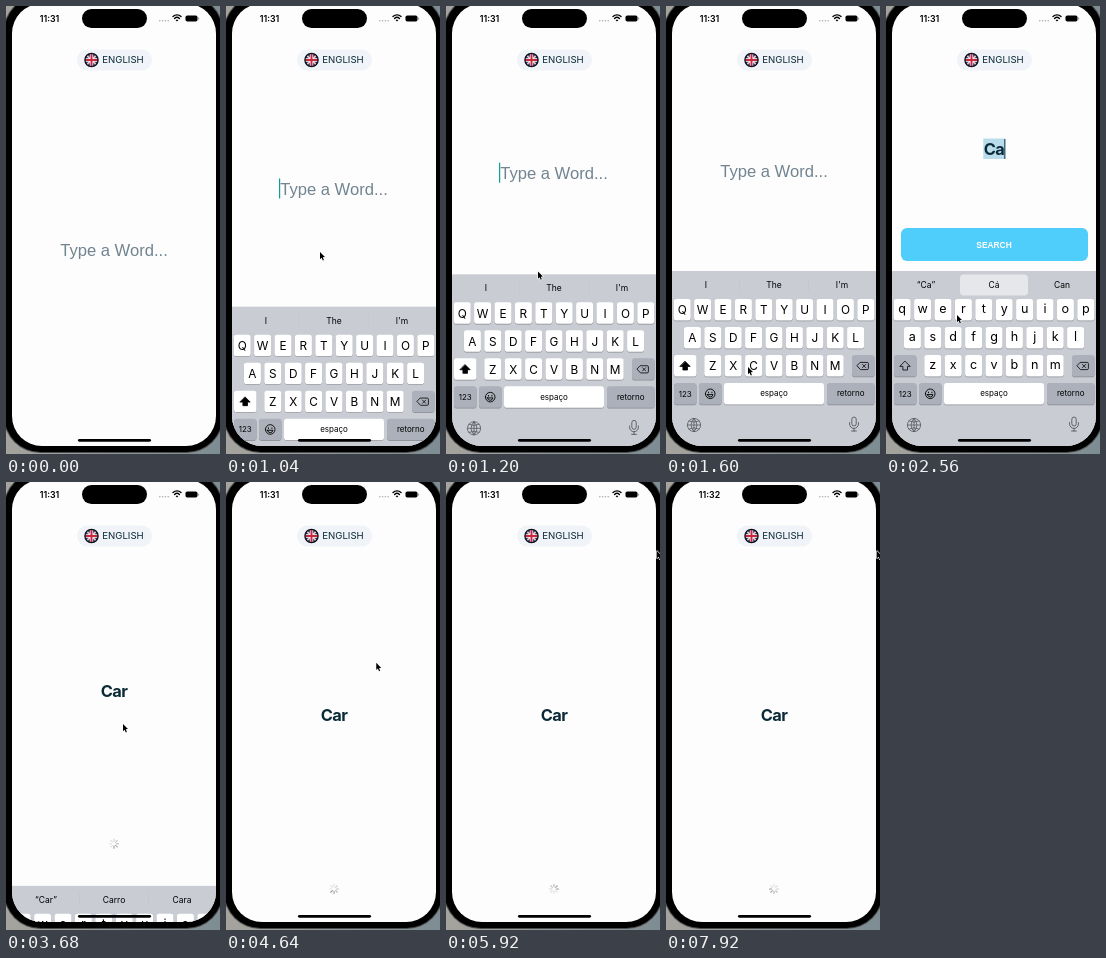
Recreate the animation shown at these times as an HTML page with a canvas. Size 214 px wide and 448 px high, loop 8000 ms.

```html
<!DOCTYPE html>
<html lang="en">
<head>
<meta charset="utf-8">
<title>Dictionary app</title>
<style>
  html, body { margin: 0; width: 100%; height: 100%; overflow: hidden; background: #000; }
  canvas { display: block; width: 214px; height: 448px; }
</style>
</head>
<body>
<canvas id="stage"></canvas>
<script>
const W = 214, H = 448, LOOP = 8000;
const canvas = document.getElementById('stage');
const scale = window.devicePixelRatio || 1;
canvas.width = W * scale;
canvas.height = H * scale;
const ctx = canvas.getContext('2d');

const UI = 'Inter, Roboto, sans-serif';
const APP = '"Liberation Sans", sans-serif';
const INK = '#0b2a38', KEY_GRAY = '#abb0ba', ICON = '#55595f';

// Event times in ms; the page content trails the keyboard slightly
const SHOW = 878, SHOW_PAGE = 885, HIDE = 3521, HIDE_PAGE = 3537, CLOCK = 6240;
const TAPS = [[1800, 'C'], [2160, 'a'], [2720, 'r']];
const SUGGESTIONS = [
  ['I', 'The', "I'm"],
  ['“C”', 'Cá', 'Can'],
  ['“Ca”', 'Cá', 'Can'],
  ['“Car”', 'Carro', 'Cara']
];
const KEY_ROWS = ['QWERTYUIOP', 'ASDFGHJKL', 'ZXCVBNM'];
const keyX = (row, i) => 108 + (i - (KEY_ROWS[row].length - 1) / 2) * 20.4;
const keyTop = row => 28 + row * 28;

// Pointer stops: time, x, y
const POINTER = [
  [80, 29, 318], [340, 90, 57], [640, 94, 246], [1060, 94, 246],
  [1600, 82, 361], [1780, 86, 364], [1840, 86, 364], [2130, 26, 334],
  [2220, 26, 334], [2560, 71, 309], [2690, 77, 306], [2780, 77, 306],
  [3360, 117, 242], [4320, 117, 242], [5120, 211, 69]
];

const spring = ms => {
  const x = Math.max(0, ms) * 0.01826;
  return 1 - (1 + x) * Math.exp(-x);
};

function box(x, y, w, h, r, fill) {
  ctx.beginPath();
  ctx.roundRect(x, y, w, h, r);
  ctx.fillStyle = fill;
  ctx.fill();
}

function text(str, x, y, size, { color = '#000', weight = 400, font = UI, align = 'center' } = {}) {
  ctx.font = `${weight} ${size}px ${font}`;
  ctx.textAlign = align;
  ctx.fillStyle = color;
  ctx.fillText(str, x, y);
}

function path(d, { fill, stroke, width = 0.8, x = 0, y = 0 }) {
  ctx.save();
  ctx.translate(x, y);
  const shape = new Path2D(d);
  ctx.lineWidth = width;
  ctx.lineCap = ctx.lineJoin = 'round';
  if (stroke) { ctx.strokeStyle = stroke; ctx.stroke(shape); }
  if (fill) { ctx.fillStyle = fill; ctx.fill(shape); }
  ctx.restore();
}

function drawBody() {
  const backdrop = ctx.createLinearGradient(0, 0, W, 0);
  backdrop.addColorStop(0, '#a5a39d');
  backdrop.addColorStop(1, '#7d8d93');
  ctx.fillStyle = backdrop;
  ctx.fillRect(0, 0, W, H);
  box(-2.5, -11, 220, 458, 37, '#4b4c4d');
  box(-1.5, -10, 218, 456, 36, '#000');
}

function drawStatus(t) {
  text(t < CLOCK ? '11:31' : '11:32', 43.5, 16, 8.8, { weight: 600 });
  box(76, 3, 65, 19, 9.5, '#000');
  for (let i = 0; i < 4; i++) box(153 + i * 2.8, 14, 1.6, 1.6, 0.8, '#aaa');
  path('M-4-1.5A5.8 5.8 0 0 1 4-1.5M-2.4.4A3.5 3.5 0 0 1 2.4.4', { stroke: '#000', width: 1.4, x: 171, y: 12 });
  path('M-1.3 2.2A1.9 1.9 0 0 1 1.3 2.2L0 3.6Z', { fill: '#000', x: 171, y: 12 });
  box(179.5, 9.5, 12, 6, 1.8, '#000');
  box(192.2, 11.5, 0.9, 2.2, 0.4, '#888');
}

function drawLanguage() {
  box(71, 43.5, 75, 21, 10.5, '#f0f3f7');
  ctx.save();
  ctx.translate(85.5, 54);
  ctx.beginPath();
  ctx.arc(0, 0, 6.6, 0, 7);
  ctx.clip();
  ctx.fillStyle = '#1d2f6b';
  ctx.fillRect(-7, -7, 14, 14);
  const diagonals = 'M-7-7L7 7M-7 7L7-7', cross = 'M0-7V7M-7 0H7';
  path(diagonals, { stroke: '#fff', width: 1.6 });
  path(diagonals, { stroke: '#c8283c', width: 0.6 });
  path(cross, { stroke: '#fff', width: 3.4 });
  path(cross, { stroke: '#c8283c', width: 2 });
  ctx.restore();
  ctx.beginPath();
  ctx.arc(85.5, 54, 6.6, 0, 7);
  ctx.lineWidth = 1.3;
  ctx.strokeStyle = '#0c1119';
  ctx.stroke();
  text('ENGLISH', 117, 57.4, 9.6, { color: INK });
}

function drawSpinner(y, t) {
  const head = Math.floor((t - 50) / 100);
  ctx.lineWidth = 1.1;
  ctx.lineCap = 'round';
  for (let i = 0; i < 8; i++) {
    const age = (head - i + 800) % 8, a = i * Math.PI / 4;
    ctx.strokeStyle = `rgba(70,70,75,${Math.max(0.16, 0.55 - age * 0.08)})`;
    ctx.beginPath();
    ctx.moveTo(108 + 2.3 * Math.sin(a), y - 2.3 * Math.cos(a));
    ctx.lineTo(108 + 4.6 * Math.sin(a), y - 4.6 * Math.cos(a));
    ctx.stroke();
  }
}

function drawWord(t, typed) {
  const searching = t >= HIDE;
  const shown = searching ? 1 - spring(t - HIDE_PAGE) : spring(t - SHOW_PAGE);
  const y = searching ? 233 - 90 * shown : typed ? 143 : 243.5 - 78.5 * shown;
  const word = 'Car'.slice(0, typed);
  const lastEdit = typed ? TAPS[typed - 1][0] : SHOW;
  const caret = t >= SHOW && !searching && (t - lastEdit) % 1000 < 500;

  ctx.letterSpacing = '-0.6px';
  ctx.font = `700 16.4px ${UI}`;
  const width = ctx.measureText(word).width;
  if (typed === 2) box(108 - width / 2 - 0.5, y - 10.5, width + 1, 20.5, 0, '#b9dcea');
  if (typed) text(word, 108, y + 6, 16.4, { weight: 700, color: INK });
  ctx.letterSpacing = '0px';
  if (!typed) text('Type a Word...', 108, y + 6, 16.6, { font: APP, color: '#718490' });
  if (caret) box(typed ? 108 + width / 2 : 53, y - 10, 1.2, 20, 0, typed ? '#174e62' : '#0f9d98');

  if (searching) drawSpinner(407 - 173 * shown, t);
  else if (typed) {
    box(15, 222, 187, 33, 6, '#4fcdfb');
    text('SEARCH', 108, 241.6, 8.4, { weight: 700, font: APP, color: '#fff' });
  }
}

function key(x, y, w, fill = '#fff') {
  box(x, y + 0.7, w, 21.5, 2.8, '#898c92');
  box(x, y, w, 21.5, 2.8, fill);
}

function drawSuggestions(typed) {
  if (typed === 1 || typed === 2) box(74, 3.5, 68, 21, 4, '#e5e7eb');
  else [73, 142].forEach(x => box(x, 7, 0.5, 13, 0, '#bfc3ca'));
  SUGGESTIONS[typed].forEach((s, i) => text(s, 40 + i * 68, 17, 8.5));
}

function drawPopup(t) {
  const tap = TAPS.find(([at]) => t >= at - 60 && t < at + 60);
  if (!tap) return;
  const letter = tap[1].toUpperCase();
  const row = KEY_ROWS.findIndex(r => r.includes(letter));
  const x = keyX(row, KEY_ROWS[row].indexOf(letter)), y = keyTop(row);
  box(x - 8.5, y - 8, 17, 29.5, 3, '#fff');
  box(x - 14, y - 29, 28, 26, 5, '#fff');
  text(tap[1], x, y - 10, 18);
}

function drawKeyboard(t, typed) {
  const shown = t < HIDE ? spring(t - SHOW) : 1 - spring(t - HIDE);
  if (shown < 0.004) return;
  ctx.save();
  ctx.translate(0, 441 - 176 * shown);
  ctx.fillStyle = '#c9ccd3';
  ctx.fillRect(0, 0, W, 200);
  drawSuggestions(typed);

  KEY_ROWS.forEach((row, r) => [...row].forEach((letter, i) => {
    const x = keyX(r, i), y = keyTop(r);
    key(x - 8.5, y, 17);
    if (typed) text(letter.toLowerCase(), x, y + 14.4, 12.6);
    else text(letter, x, y + 15.2, 11.8);
  }));

  key(8, 84, 22.5, typed ? KEY_GRAY : '#fff');
  path('M0-4.6L5 .4H2.3V4H-2.3V.4H-5Z', { fill: typed ? null : '#000', stroke: '#000', x: 19.2, y: 95 });
  key(186, 84, 22.5, KEY_GRAY);
  path('M-2.5-3.6H4.2Q5.4-3.6 5.4-2.4V2.4Q5.4 3.6 4.2 3.6H-2.5L-5.8 0ZM-.5-1.6L2.7 1.6M2.7-1.6L-.5 1.6',
    { stroke: '#000', x: 197, y: 95 });

  key(8, 112, 22.5, KEY_GRAY);
  text('123', 19.2, 125.7, 8);
  key(33, 112, 22.5, KEY_GRAY);
  path('M-4.8 0A4.8 4.8 0 1 1 4.8 0A4.8 4.8 0 1 1-4.8 0M-1.7-1.7V-1M1.7-1.7V-1M-2.8.8H2.8Q2.2 3.2 0 3.2T-2.8.8Z',
    { stroke: '#000', width: 0.9, x: 44.2, y: 122.8 });
  key(58, 112, 100);
  text('espaço', 108, 125.4, 8);
  key(161, 112, 47.5, KEY_GRAY);
  text('retorno', 184.7, 125.4, 8);

  path('M-6.6 0A6.6 6.6 0 1 1 6.6 0A6.6 6.6 0 1 1-6.6 0H6.6M0-6.6V6.6M0-6.6Q-6 0 0 6.6Q6 0 0-6.6M-5-4Q0-1.6 5-4M-5 4Q0 1.6 5 4',
    { stroke: ICON, x: 28, y: 154 });
  path('M-2.2-4.8A2.2 2.2 0 0 1 2.2-4.8V-.2A2.2 2.2 0 0 1-2.2-.2ZM-4.4-1.4V0A4.4 4.4 0 0 0 4.4 0V-1.4M0 4.4V7M-2.4 7H2.4',
    { stroke: ICON, width: 0.9, x: 188, y: 153 });
  drawPopup(t);
  ctx.restore();
}

function drawPointer(t) {
  if (t < POINTER[0][0]) return;
  const next = POINTER.findIndex(p => p[0] > t);
  let [, x, y] = POINTER[POINTER.length - 1];
  if (next > 0) {
    const [t0, x0, y0] = POINTER[next - 1], [t1, x1, y1] = POINTER[next];
    const u = (t - t0) / (t1 - t0), k = u * u * (3 - 2 * u);
    x = x0 + (x1 - x0) * k;
    y = y0 + (y1 - y0) * k;
  }
  path('M0 0V7.2L1.6 5.8L2.8 8.4L3.9 7.9L2.8 5.3L5 5.1Z', { fill: '#000', stroke: '#fff', width: 1.2, x, y });
}

function draw(t) {
  const typed = TAPS.filter(([at]) => t >= at).length;
  ctx.setTransform(scale, 0, 0, scale, 0, 0);
  drawBody();
  ctx.save();
  ctx.beginPath();
  ctx.roundRect(6, -2.5, 204, 442.5, 30);
  ctx.clip();
  ctx.fillStyle = '#fdfdfd';
  ctx.fillRect(0, -3, W, H);
  drawStatus(t);
  drawLanguage();
  drawWord(t, typed);
  drawKeyboard(t, typed);
  box(72, 433, 73, 2.7, 1.35, '#000');
  ctx.restore();
  drawPointer(t);
}

function tick() {
  draw(performance.now() % LOOP);
  requestAnimationFrame(tick);
}
tick();
</script>
</body>
</html>
```
